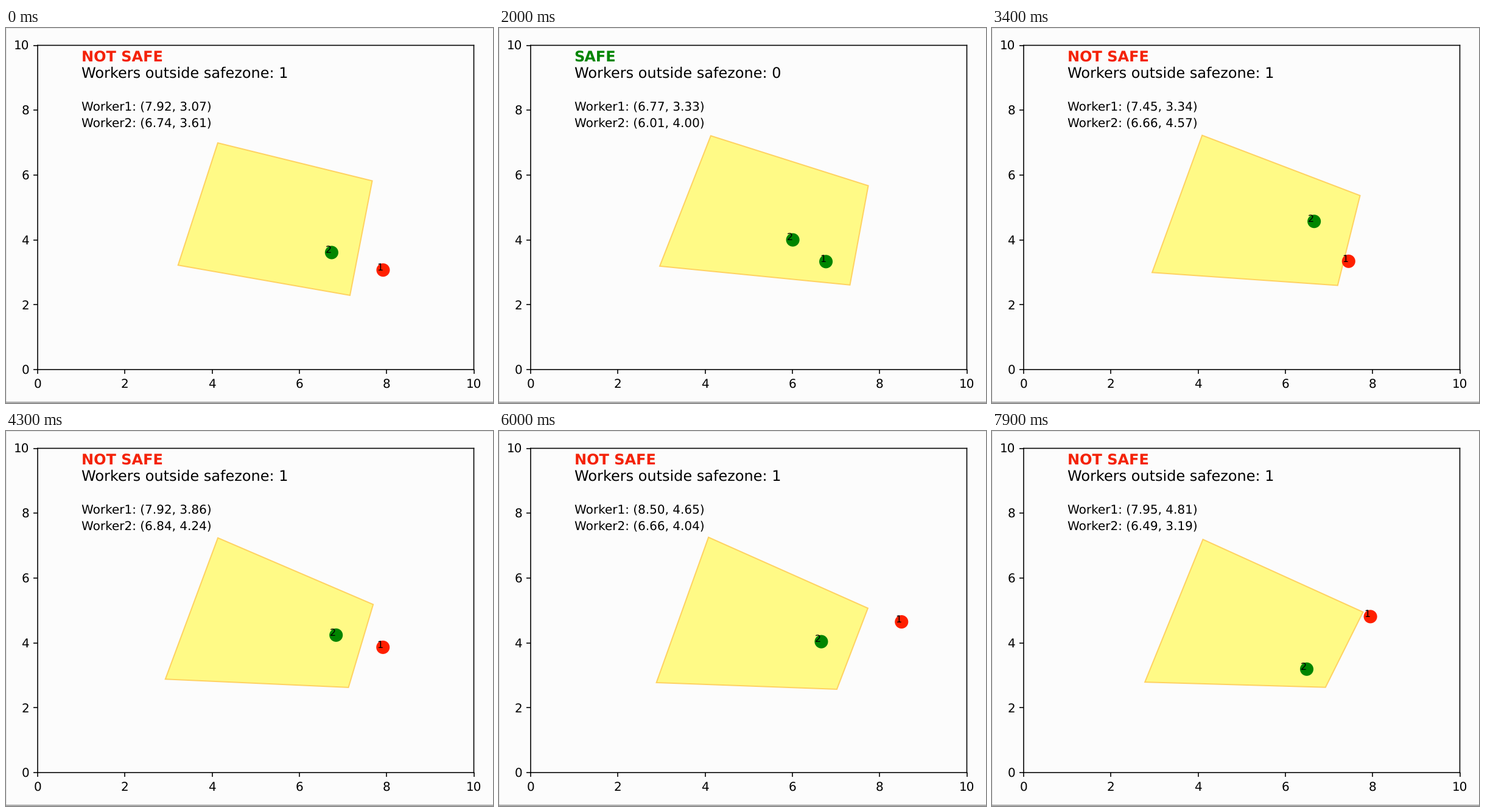
Write a matplotlib script that moves like this. It is 800 px wide and 617 px high and loops after 8000 ms.

```python
import numpy as np
import matplotlib.pyplot as plt
from matplotlib.animation import FuncAnimation
from matplotlib.patches import Polygon, Rectangle
from matplotlib.path import Path

W, H, DPI = 800, 617, 128
FRAMES, INTERVAL = 80, 100
PT = 144.35 / DPI  # the drawing is scaled as if at 144.35 dpi
RED, GREEN, ALERT = "#ff2000", "#008500", "#f42208"
FILL, EDGE, PAPER = "#fffa86", "#ffd262", "#fcfcfc"

plt.rcParams["font.family"] = "DejaVu Sans"
plt.rcParams["text.hinting"] = "none"
rng = np.random.default_rng(5)

KEYS = [0, 10, 20, 34, 50, 70, 79]
worker_keys = np.array([
    [(7.92, 3.07), (7.25, 3.06), (6.77, 3.33), (7.45, 3.34),
     (8.29, 4.23), (8.16, 5.39), (7.95, 4.81)],
    [(6.74, 3.61), (6.30, 4.13), (6.01, 4.00), (6.66, 4.57),
     (6.92, 4.31), (6.33, 3.66), (6.49, 3.19)],
]).swapaxes(0, 1)
zone_keys = np.array([
    [(4.13, 6.99), (7.67, 5.82), (7.16, 2.29), (3.22, 3.22)],
    [(4.13, 7.21), (7.74, 5.67), (7.32, 2.61), (2.96, 3.19)],
    [(4.05, 7.24), (7.68, 5.02), (7.06, 2.58), (2.93, 2.77)],
    [(4.11, 7.19), (7.78, 4.95), (6.92, 2.63), (2.78, 2.79)],
])


def tween(keys, values):
    columns = values.reshape(len(keys), -1).T
    path = [np.interp(np.arange(FRAMES), keys, c) for c in columns]
    return np.column_stack(path).reshape(FRAMES, *values.shape[1:])


def wander(keys, values, step):
    """Tween with a random walk on top that returns to zero at KEYS."""
    walk = rng.normal(0, step, (FRAMES, *values.shape[1:])).cumsum(axis=0)
    return tween(keys, values) + walk - tween(KEYS, walk[KEYS])


workers = wander(KEYS, worker_keys, 0.06)
corners = wander(KEYS[::2], zone_keys, 0.015)

fig = plt.figure(figsize=(W / DPI, H / DPI), dpi=DPI, facecolor=PAPER)
ax = fig.add_axes([52 / W, 55 / H, 716.5 / W, 533.5 / H], facecolor=PAPER)
ax.set(xlim=(0, 10), ylim=(0, 10), xticks=range(0, 11, 2), yticks=range(0, 11, 2))
ax.tick_params(labelsize=10 * PT, length=3.5 * PT, width=0.8 * PT, pad=3.5 * PT)
ax.tick_params(axis="x", pad=4 * PT)
for spine in ax.spines.values():
    spine.set(linewidth=0.8 * PT, snap=False)

# thin window border
for x, y, w, h, color in [(0, H - 1, W, 1, "#e2e2e2"), (0, 0, 1, H, "#e2e2e2"),
                          (0, 0, W, 1, "#d0d0d0"), (0, 1, W, 1, "#808080")]:
    fig.add_artist(Rectangle((x, y), w, h, transform=None, color=color, lw=0))

zone = ax.add_patch(Polygon(corners[0], closed=True, fc=FILL, ec=EDGE, lw=PT))
dots = ax.scatter(*workers[0].T, s=(11 * PT) ** 2, c=[RED, GREEN], lw=0, zorder=2)
tags = [ax.text(0, 0, str(i), size=8 * PT, ha="right") for i in (1, 2)]
status = ax.text(1, 9.5, "", size=12 * PT, weight="bold")
count = ax.text(1, 9, "", size=12 * PT)
coords = [ax.text(1, y, "", size=10 * PT) for y in (8, 7.5)]


def update(n):
    zone.set_xy(corners[n])
    inside = Path(corners[n]).contains_points(workers[n])
    dots.set_offsets(workers[n])
    dots.set_facecolors([GREEN if ok else RED for ok in inside])
    for i, (x, y) in enumerate(workers[n]):
        tags[i].set_position((x, y - 0.015))
        coords[i].set_text(f"Worker{i + 1}: ({x:.2f}, {y:.2f})")
    status.set_text("SAFE" if inside.all() else "NOT SAFE")
    status.set_color(GREEN if inside.all() else ALERT)
    count.set_text(f"Workers outside safezone: {(~inside).sum()}")
    return [zone, dots, *tags, status, count, *coords]


anim = FuncAnimation(fig, update, frames=FRAMES, interval=INTERVAL,
                     repeat=True, repeat_delay=0, blit=False)
plt.show()
```
